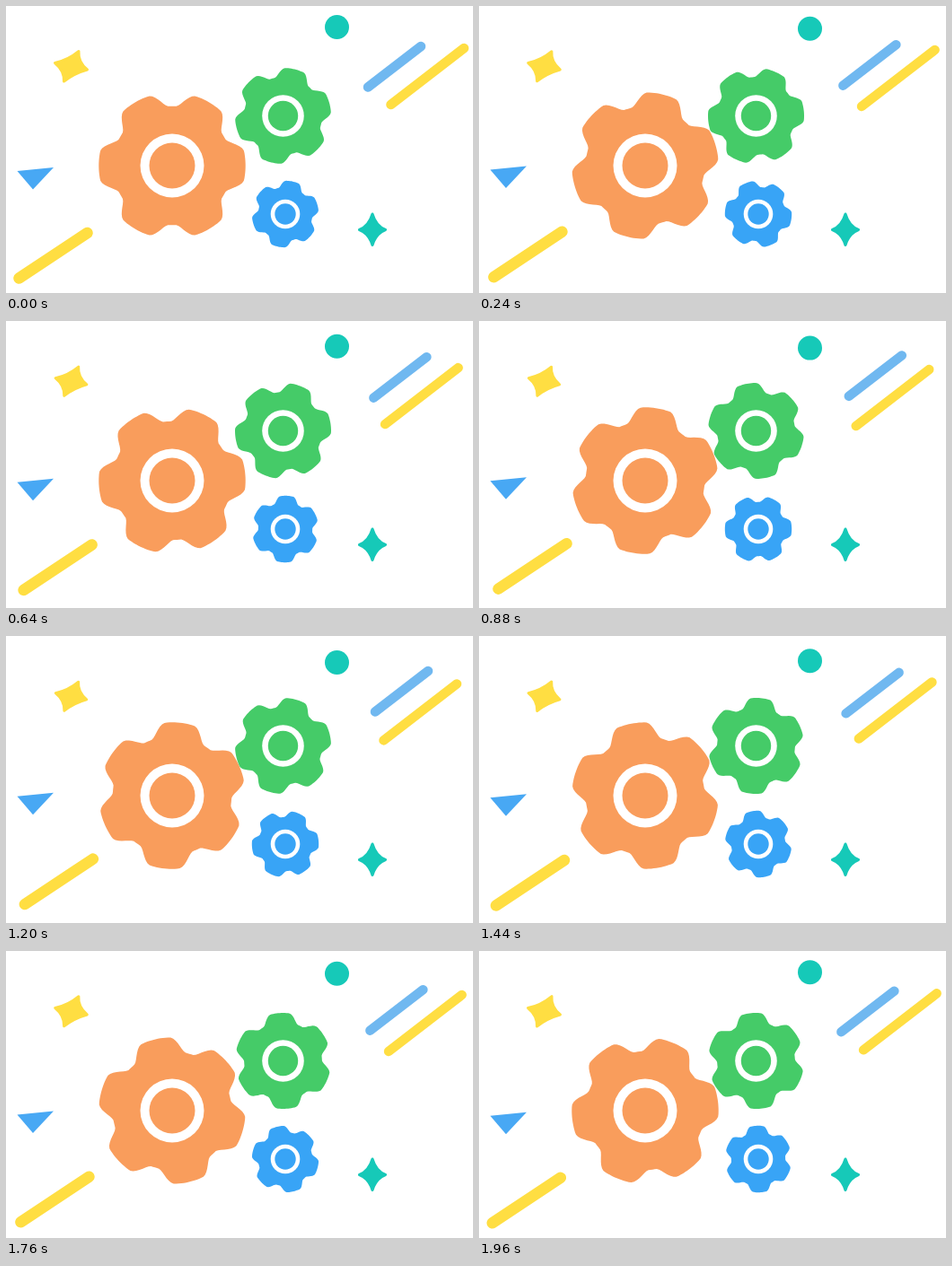
An HTML page that plays this animation: 520x320 px, repeating every 2 s.

```html
<!DOCTYPE html>
<html lang="en">
<head>
<meta charset="utf-8">
<title>Gears</title>
<style>
  html, body { margin: 0; width: 100%; height: 100%; overflow: hidden; background: #fff; }
  svg { display: block; width: 520px; height: 320px; }
  line { stroke-linecap: round; }
  .star { stroke-width: 3; stroke-linejoin: round; }
</style>
</head>
<body>
<svg viewBox="0 0 520 320">
  <g class="star" id="spark" fill="#ffde42" stroke="#ffde42">
    <path d="M81 50.5Q80 62 90.5 71Q76 75 64.5 84Q65 72 54.5 63.500Q69 60.500 81 50.5Z"/>
  </g>
  <path class="star" fill="#16c9b8" stroke="#16c9b8"
    d="M408 232Q412 245.500 422.500 249.500Q412 253.500 408 266.500Q404 253.500 393.500 249.500Q404 245.500 408 232Z"/>
  <g data-move="0 7.5"><circle cx="368.5" cy="23.5" r="13.5" fill="#16c9b8"/></g>
  <g data-move="0 -6.5"><path d="M12.500 184L53 180L30 204.500Z" fill="#48a8f4"/></g>
  <g data-move="10 -7.5"><line x1="403" y1="90.500" x2="462" y2="45" stroke="#70b8f0" stroke-width="10.5"/></g>
  <g data-move="-10 8"><line x1="428.500" y1="110" x2="510" y2="47" stroke="#ffde42" stroke-width="10.5"/></g>
  <g data-move="8 -5.5"><line x1="14.500" y1="303.500" x2="90.500" y2="253" stroke="#ffde42" stroke-width="12.5"/></g>
  <g id="gears"></g>
</svg>
<script>
const LOOP = 2000, STEP = 40;
const NS = "http://www.w3.org/2000/svg";
const host = document.getElementById("gears");
const spark = document.getElementById("spark");
const movers = [...document.querySelectorAll("[data-move]")].map(node => {
  const [dx, dy] = node.dataset.move.split(" ").map(Number);
  return { node, dx, dy };
});

function add(parent, name, attrs) {
  const node = document.createElementNS(NS, name);
  for (const key in attrs) node.setAttribute(key, attrs[key]);
  return parent.appendChild(node);
}

// Six flat teeth that ease down into rounded notches; one tooth points up.
function gearPath(size) {
  let d = "";
  for (let deg = 0; deg < 360; deg += 2) {
    const off = Math.abs((deg + 30) % 60 - 30);
    const t = Math.min(1, Math.max(0, (off - 11) / 16));
    const r = size * (1 - 0.19 * t * t * (3 - 2 * t));
    const a = deg * Math.PI / 180;
    d += (d ? "L" : "M") + (r * Math.sin(a)).toFixed(2) + " " + (-r * Math.cos(a)).toFixed(2);
  }
  return d + "Z";
}

function makeGear(x, y, size, hole, hub, color, angle) {
  const g = add(host, "g", { transform: `translate(${x} ${y})` });
  const wheel = add(g, "path", { d: gearPath(size), fill: color });
  add(g, "circle", { r: hole, fill: "#fff" });
  add(g, "circle", { r: hub, fill: color });
  return { wheel, angle };
}

// 0 to 1 and back, each way lasting span
const swing = (t, span) => 1 - Math.abs(1 - t % (2 * span) / span);

const gears = [
  makeGear(185, 178, 81.7, 35.5, 25.5, "#f99d5c", t => 30 + 360 * t / LOOP),
  makeGear(308.5, 122.5, 53.5, 23.3, 16.7, "#45cb68", t => 14 + 236 * swing(t, 808)),
  makeGear(311, 232, 37.2, 16.3, 11.7, "#38a4f6", t => 12 + 720 * t / LOOP)
];

function draw(t) {
  const p = swing(t, LOOP / 2);
  for (const { node, dx, dy } of movers)
    node.setAttribute("transform", `translate(${dx * p} ${dy * p})`);
  spark.setAttribute("transform",
    `translate(72.5 67) scale(${1 - 0.05 * p}) translate(-72.5 -67)`);
  for (const { wheel, angle } of gears)
    wheel.setAttribute("transform", `rotate(${angle(t)})`);
}

const start = performance.now();
function tick() {
  const t = (performance.now() - start) % LOOP;
  draw(Math.floor(t / STEP) * STEP);
  requestAnimationFrame(tick);
}
draw(0);
requestAnimationFrame(tick);
</script>
</body>
</html>
```
